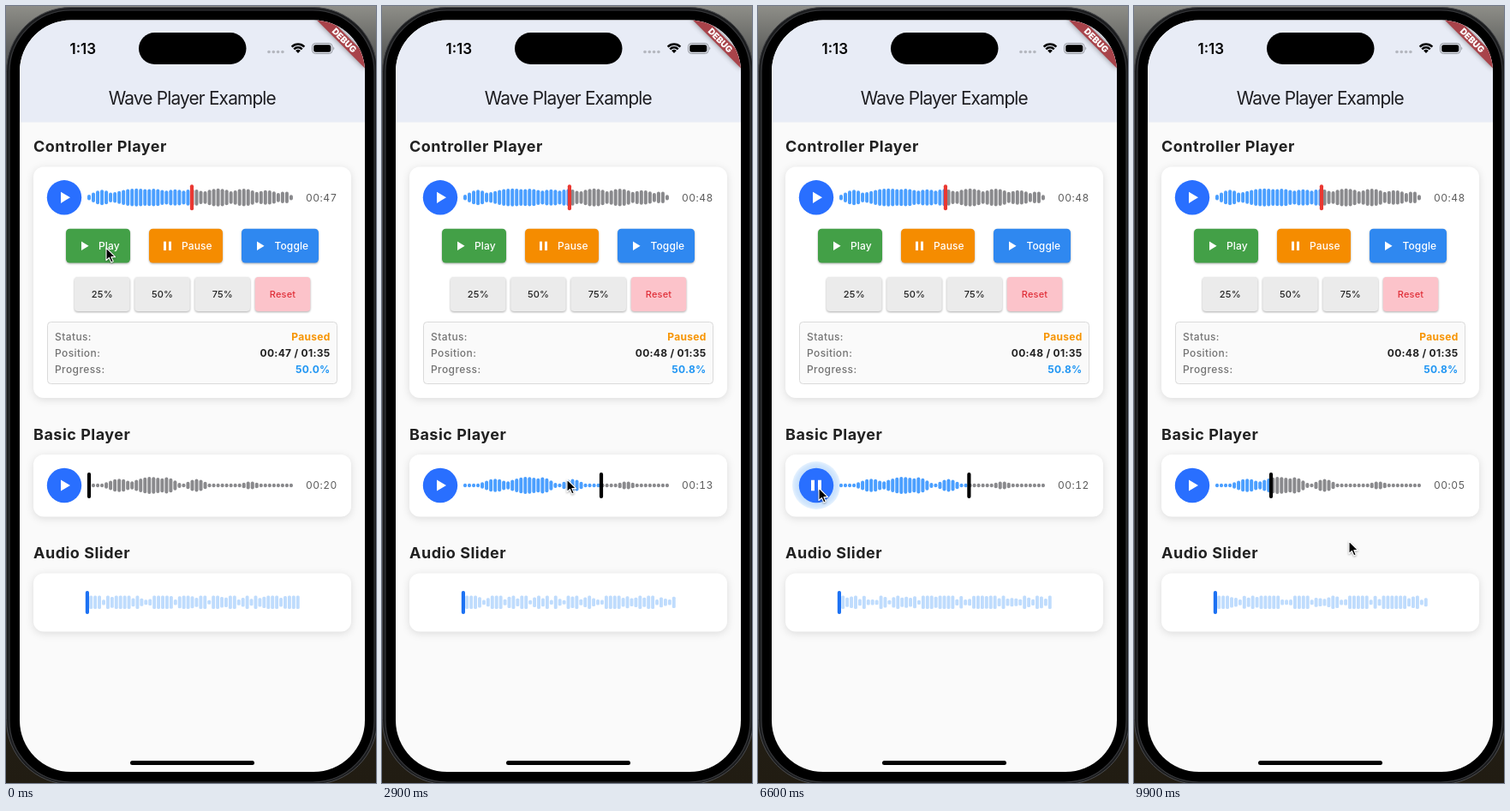
Write an HTML page that moves like this. It is 432x906 px and loops after 10000 ms.

```html
<!DOCTYPE html>
<html lang="en">
<head>
<meta charset="utf-8">
<title>Wave Player Example</title>
<style>
  html, body { margin: 0; width: 100%; height: 100%; overflow: hidden; background: #1a1917; }
  svg { display: block; width: 432px; height: 906px; }
  text { font-family: Inter, Roboto, "Liberation Sans", sans-serif; white-space: pre; }
  .title { font-size: 20.8px; letter-spacing: -.8px; fill: #1c1c20; }
  .clock { font-size: 17px; font-weight: 600; }
  .head { font-size: 18px; font-weight: 700; letter-spacing: .5px; fill: #212121; }
  .time { font-size: 12px; letter-spacing: .5px; fill: #5c5c5c; font-variant-numeric: tabular-nums; }
  .btn { font-size: 12px; font-weight: 500; letter-spacing: .1px; fill: #fff; }
  .chip { font-size: 11px; font-weight: 500; letter-spacing: .2px; text-anchor: middle; fill: #222; }
  .label { font-size: 12px; font-weight: 500; letter-spacing: .4px; fill: #737373; }
  .value { font-size: 12px; font-weight: 700; letter-spacing: .3px; text-anchor: end; }
  .debug { font-size: 10.2px; font-weight: 900; text-anchor: middle; fill: #fff; }
  .card { fill: #fff; filter: drop-shadow(0 2px 5px rgba(0,0,0,.12)); }
  .raised { filter: drop-shadow(0 1px 1.2px rgba(0,0,0,.32)); }
</style>
</head>
<body>
<svg id="stage" viewBox="0 0 432 906"></svg>
<script>
const LOOP = 10000, STEP = 100;
const BARS = 48, PITCH = 5.02, LEFT = 97, TRACK = 240;
const SONG = 95, CLIP = 20.4;

// Loudness swells: centre bar, width, height
const songSwells = [[3,3,18],[11,7,21],[15,5,20.5],[20,5,19],[24,4,20],[30,5,21],[36,4.5,20.5],[41.3,4,17],[45.5,1.6,15]];
const clipSwells = [[7,3.5,15.5],[14.3,5,20],[18,2.8,19],[25,2.6,15],[37.5,2.5,9.5]];
const loudness = (swells, i) =>
  Math.max(4.5, ...swells.map(([c, w, h]) => h * Math.exp(-(((i - c) / w) ** 2))));

// Rests: from, until, then the values held
const cursorRests = [[0,400,117,282],[900,1300,205,279],[2000,2200,98,556],[2700,2700,256,553],
  [2900,2900,216,552],[4600,5000,65,554],[6600,7100,71,562],[7700,8000,254,557],
  [8900,9100,160,560],[9800,LOOP,251,624]];
const clipRests = [[0,2200,97],[2700,2900,256],[3300,5000,228],[7200,8000,253.3],[8900,LOOP,160]];
const songRests = [[0,200,.5],[1000,LOOP,.508]];
const songRun = [200, 1060], clipRun = [4720, 7200];

const rect = (x, y, w, h, r, attrs) =>
  `<rect x="${x}" y="${y}" width="${w}" height="${h}" rx="${r}" ${attrs}/>`;
const label = (cls, x, y, str, attrs = "") =>
  `<text class="${cls}" x="${x}" y="${y}" ${attrs}>${str}</text>`;
const triangle = (x, y) => `<path d="M${x} ${y - 5.2}l8.6 5.2-8.6 5.2z" fill="#fff"/>`;
const pauseIcon = (x, y) =>
  [x, x + 6].map(left => rect(left, y - 5.2, 3, 10.4, 0, 'fill="#fff"')).join("");

const bars = (id, count, x0, pitch, width, round, y, height) =>
  `<g id="${id}" fill="#bfdcfd">` + Array.from({ length: count }, (_, i) => {
    const h = height(i);
    return rect((x0 + i * pitch - width / 2).toFixed(2), y - h / 2, width, h, round, "");
  }).join("") + "</g>";

const button = (x, w, color, name, textX, icon) =>
  rect(x, 259.8, w, 39.8, 4.5, `class="raised" fill="${color}"`) + icon + label("btn", textX, 284.4, name);

const chip = (i, name, fill = "#ebebeb", ink = "#222") => {
  const x = 80 + i * 70.25;
  return rect(x, 316, 64.5, 40, 4, `class="raised" fill="${fill}"`) +
    label("chip", x + 32.3, 340, name, `style="fill:${ink}"`);
};

const player = (id, y, swells) =>
  `<circle id="${id}Halo" cx="68" cy="${y}" r="28" fill="url(#halo)" opacity="0"/>
   <circle cx="68" cy="${y}" r="20.2" fill="#296fff"/>
   <path id="${id}Icon" fill="#fff"/>` +
  bars(id + "Bars", BARS, LEFT, PITCH, 4, 2, y, i => loudness(swells, i)) +
  `<rect id="${id}Mark" y="${y - 15}" width="4.2" height="30" rx="2"/>` +
  label("time", 350, y + 4.4, "", `id="${id}Time"`);

const arc = r => {
  const d = r * Math.SQRT1_2;
  return `<path d="M${341 - d} ${55 - d}A${r} ${r} 0 0 1 ${341 + d} ${55 - d}" fill="none" stroke="#000" stroke-width="2.5"/>`;
};

const signal = Array.from({ length: 4 }, (_, i) =>
  `<circle cx="${307 + i * 5.3}" cy="53.5" r="1.8" fill="#b4b7bf"/>`).join("");

const statusBar = label("clock", 74.5, 55.8, "1:13") +
  rect(155, 31, 125.5, 37, 18.5, 'fill="#000"') +
  signal + arc(10.4) + arc(6.7) + `<path d="M341 55l-2.9-2.9a4.1 4.1 0 0 1 5.8 0z"/>` +
  rect(357.5, 43.5, 23.5, 12, 3.8, 'fill="none" stroke="#92959c"') +
  rect(359.2, 45.2, 20.1, 8.6, 2.3, "") +
  `<path d="M382.3 47.6q2 1.9 0 3.8z" fill="#92959c"/>`;

const ribbon = `<g transform="translate(419 16) rotate(45)">` +
  rect(-40, 28, 80, 12, 0, 'fill="#a8434a" style="filter:drop-shadow(0 0 3px rgba(0,0,0,.45))"') +
  label("debug", 0, 37.6, "DEBUG") + "</g>";

document.getElementById("stage").innerHTML = `
<defs>
  <clipPath id="screen">${rect(16, 16.5, 403, 876.5, 60, "")}</clipPath>
  <linearGradient id="back" x2="0" y2="1">
    <stop offset="0" stop-color="#8e8e88"/><stop offset=".06" stop-color="#5d5e5c"/>
    <stop offset=".3" stop-color="#292929"/><stop offset="1" stop-color="#211c12"/>
  </linearGradient>
  <radialGradient id="halo">
    <stop offset=".7" stop-color="#c5dffc"/><stop offset=".88" stop-color="#d3e7fd"/>
    <stop offset="1" stop-color="#e6f2fe"/>
  </radialGradient>
</defs>
${rect(0, 0, 432, 906, 0, 'fill="url(#back)"')}
${rect(.5, 1.5, 433, 906, 75, 'fill="#1b1c1e" stroke="#4b4c4f"')}
${rect(4, 5, 426, 900, 72, 'fill="#000" stroke="#36373a" stroke-width="1.2"')}
<g clip-path="url(#screen)">
  ${rect(16, 16, 403, 877, 0, 'fill="#fafafa"')}
  ${rect(16, 16, 403, 119.5, 0, 'fill="#e8ecf6"')}
  ${ribbon}
</g>
${statusBar}
${label("title", 217.3, 115.2, "Wave Player Example", 'text-anchor="middle"')}
${label("head", 32, 170, "Controller Player")}
${rect(32, 187.5, 371, 269.5, 12, 'class="card"')}
${player("song", 223.3, songSwells)}
${button(70, 75, "#43a047", "Play", 108, triangle(88, 279.8))}
${button(167, 86, "#f58c00", "Pause", 205, pauseIcon(184, 279.8))}
${rect(167, 259.8, 86, 39.8, 4.5, 'id="press" fill="#fff" opacity="0"')}
${button(275, 90, "#2f88f0", "Toggle", 313.5, triangle(293, 279.8))}
${chip(0, "25%")}${chip(1, "50%")}${chip(2, "75%")}${chip(3, "Reset", "#fcc3ca", "#e0303a")}
${rect(48.5, 368.5, 338, 72, 4, 'fill="#fafafa" stroke="#dadada"')}
${["Status", "Position", "Progress"].map((name, i) =>
  label("label", 57, 390 + i * 19.1, name + ":") +
  label("value", 378.6, 390 + i * 19.1, "", `id="${name}"`)).join("")}
${label("head", 32, 506, "Basic Player")}
${rect(32, 523, 371, 72.5, 12, 'class="card"')}
${player("clip", 559, clipSwells)}
${label("head", 32, 644.3, "Audio Slider")}
${rect(32, 661.5, 371, 68, 12, 'class="card"')}
${bars("slider", 50, 99.2, 4.93, 3.9, 1.5, 695.3, () => 5)}
${rect(92.8, 682, 4.2, 27, 2, 'fill="#1d72f3"')}
${rect(145, 880, 145, 5, 2.5, 'fill="#000"')}
<path id="cursor" d="M0 0V14.6L3.4 11.5 5.8 16.9 8.2 15.8 5.9 10.6H10.6Z" fill="#000" stroke="#fff"
  stroke-width="1.1" stroke-linejoin="round" style="filter:drop-shadow(0 1px 1px rgba(0,0,0,.35))"/>`;

const el = id => document.getElementById(id);
const clamp = v => Math.max(0, Math.min(1, v));
const mix = (a, b, k) => a + (b - a) * k;
const smooth = v => v * v * (3 - 2 * v);
const linear = v => v;
const mmss = s => [s / 60, s % 60].map(v => String(Math.floor(v)).padStart(2, "0")).join(":");

// Hold each rest, and glide from one to the next.
function follow(rests, t, ease = linear) {
  const i = rests.findLastIndex(([from]) => from <= t);
  const [, until, ...here] = rests[i];
  if (t <= until) return here;
  const [arrive, , ...next] = rests[i + 1];
  const k = ease((t - until) / (arrive - until));
  return here.map((v, n) => mix(v, next[n], k));
}

function randomFrom(seed) {
  return () => {
    seed = (seed + 0x6d2b79f5) | 0;
    let n = Math.imul(seed ^ (seed >>> 15), 1 | seed);
    n = (n + Math.imul(n ^ (n >>> 7), 61 | n)) ^ n;
    return ((n ^ (n >>> 14)) >>> 0) / 4294967296;
  };
}

// Two halves turn from a triangle (k = 0) into a pair of bars (k = 1).
function playPause(k, y) {
  const half = (play, pause) => {
    const [x1, x2, h1, h2] = play.map((v, i) => mix(v, pause[i], k));
    return `M${68 + x1} ${y - h1}L${68 + x2} ${y - h2}V${y + h2}L${68 + x1} ${y + h1}Z`;
  };
  return half([-4, 1.5, 6.6, 3.3], [-6, -2, 6.2, 6.2]) + half([1.5, 7, 3.3, 0], [2, 6, 6.2, 6.2]);
}

function drawPlayer(id, y, t, [on, off], markX, color, seconds) {
  const fade = (delayIn, timeIn, delayOut, timeOut) =>
    Math.min(clamp((t - on - delayIn) / timeIn), 1 - clamp((t - off - delayOut) / timeOut));
  const halo = el(id + "Halo");
  halo.setAttribute("opacity", fade(280, 250, 50, 150));
  halo.setAttribute("r", 28 + Math.sin((t - on) / 300));
  el(id + "Icon").setAttribute("d", playPause(fade(0, 280, 0, 250), y));
  const mark = el(id + "Mark");
  mark.setAttribute("x", markX - 2.1);
  mark.setAttribute("fill", color);
  [...el(id + "Bars").children].forEach((bar, i) =>
    bar.setAttribute("fill", LEFT + i * PITCH < markX - .5 ? "#4b9fff" : "#8a8a8d"));
  el(id + "Time").textContent = mmss(seconds);
}

function drawSlider(seed) {
  const random = randomFrom(seed);
  for (const bar of el("slider").children) {
    const h = Math.min(15.6, 5 + random() * 19);
    bar.setAttribute("height", h);
    bar.setAttribute("y", 695.3 - h / 2);
  }
}

function setValue(name, str, color) {
  el(name).textContent = str;
  el(name).setAttribute("fill", color);
}

function draw(t) {
  const [p] = follow(songRests, t);
  const [clipX] = follow(clipRests, t);
  const [x, y] = follow(cursorRests, t, smooth);
  const played = CLIP * (clipX - LEFT) / TRACK;
  drawPlayer("song", 223.3, t, songRun, LEFT + TRACK * p, "#ea3832", SONG * p);
  drawPlayer("clip", 559, t, clipRun, clipX, "#000", played || CLIP);

  const playing = t >= songRun[0] && t < songRun[1];
  setValue("Status", playing ? "Playing" : "Paused", playing ? "#43a047" : "#f79400");
  setValue("Position", `${mmss(SONG * p)} / ${mmss(SONG)}`, "#212121");
  setValue("Progress", (p * 100).toFixed(1) + "%", "#2196f3");
  el("press").setAttribute("opacity", t >= 1000 && t < 1400 ? .12 : 0);

  // The slider's bars are shuffled whenever either player moves.
  drawSlider(Math.round(clipX * 10 + p * 1e5));
  el("cursor").setAttribute("transform", `translate(${x} ${y})`);
}

const start = performance.now();
let shown = -1;
function tick() {
  const t = Math.floor(((performance.now() - start) % LOOP) / STEP) * STEP;
  if (t !== shown) draw(shown = t);
  requestAnimationFrame(tick);
}
tick();
</script>
</body>
</html>
```
